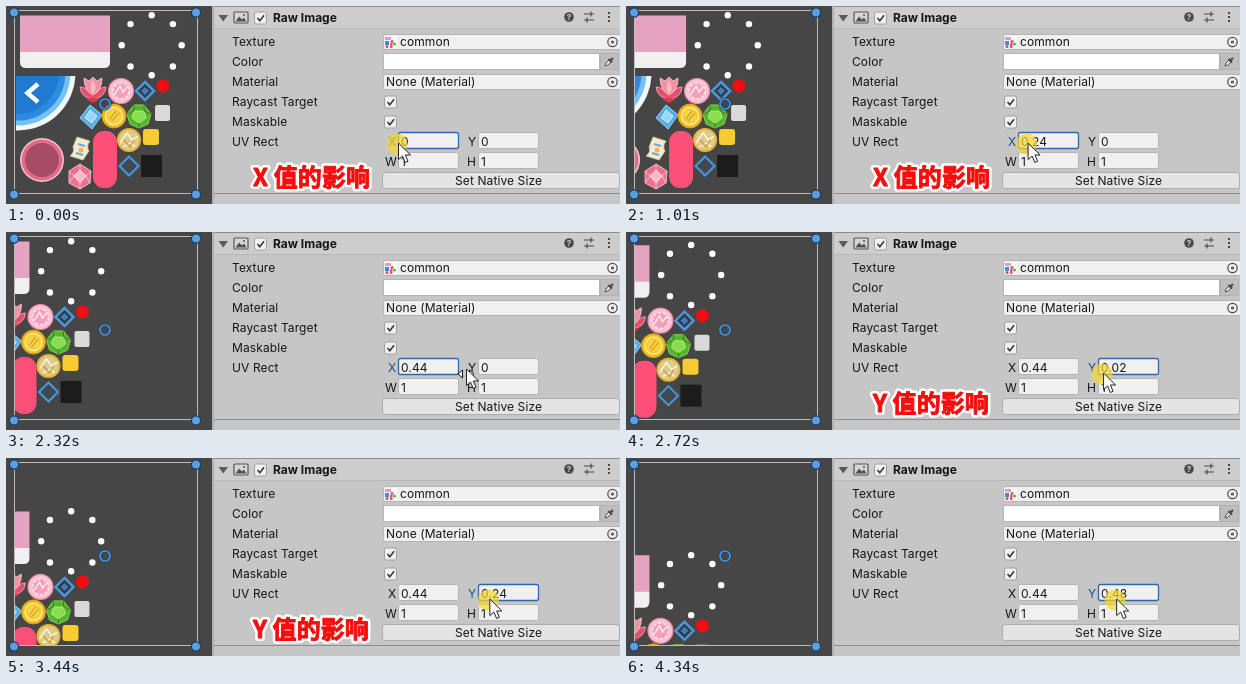
These frames come from a looping animation (614 px wide and 198 px high, 4440 ms). An HTML page:

```html
<!DOCTYPE html>
<html lang="en">
<head>
<meta charset="utf-8">
<title>UV Rect</title>
<style>
html, body { margin: 0; width: 100%; height: 100%; overflow: hidden; background: #464646; }
svg { display: block; width: 614px; height: 198px; }
text { font: 12px Inter, sans-serif; letter-spacing: .1px; fill: #151515; white-space: pre; }
.bold { font-weight: 700; letter-spacing: 0; }
.cap { font: 700 24px "Noto Sans CJK SC", "Noto Sans CJK", sans-serif; letter-spacing: .1px;
  fill: #f80c0c; stroke: #f80c0c; stroke-width: .9px; stroke-linejoin: round; }
.edge { fill: #fff; stroke: #fff; stroke-width: 6px; }
.field { fill: #f0f0f0; stroke: #b4b4b4; }
.focus { stroke: #2f67a8; stroke-width: 1.3px; }
.ico { fill: none; stroke: #4a4a4a; stroke-width: 1.2px; }
</style>
</head>
<body>
<svg viewBox="0 0 614 198">
  <defs>
    <clipPath id="view"><rect x="9" y="5" width="183" height="182"/></clipPath>
    <clipPath id="quarter"><rect x="10" y="70" width="62" height="60"/></clipPath>
    <radialGradient id="gold"><stop offset=".3" stop-color="#f8d94a"/><stop offset="1" stop-color="#eeb51c"/></radialGradient>
  </defs>
  <rect width="206" height="198" fill="#464646"/>

  <g clip-path="url(#view)"><g id="tex">
    <path d="M14 9.500H104V46.500H14Z" fill="#e5a3c1"/>
    <path d="M14 46H104V56q0 6-6 6H20q-6 0-6-6Z" fill="#f1eff0"/>
    <g id="ring" fill="#fff"></g>

    <g clip-path="url(#quarter)">
      <circle cx="12" cy="67" r="57.500" fill="#f4f8fb"/>
      <circle cx="12" cy="67" r="52.500" fill="#74c2f3"/>
      <circle cx="12" cy="67" r="47.500" fill="#2b8cdf"/>
      <circle cx="12" cy="67" r="41" fill="#1f7bd0"/>
    </g>
    <path d="M32 78L21.500 87L32 96" fill="none" stroke="#fff" stroke-width="4.500"/>

    <circle cx="36" cy="154" r="22" fill="#f3c6cf"/>
    <circle cx="36" cy="154" r="20.500" fill="#e56b86"/>
    <circle cx="36" cy="154" r="17" fill="#a64c68"/>

    <path d="M87 93Q75 92 74 81Q80 81 87 88Q94 81 100 81Q99 92 87 93Z" fill="#e4506c" stroke="#f7c3cc" stroke-width=".7"/>
    <path d="M87 89Q78 85 78 72L83 75L87 71L91 75L96 72Q96 85 87 89Z" fill="#f490a4" stroke="#fbdbe0" stroke-width=".7"/>
    <path d="M87 88Q82 82 87 74Q92 82 87 88Z" fill="#f9bcc7"/>
    <path d="M80 93Q87 91 94 93L87 97Z" fill="#d9364f"/>

    <circle cx="115" cy="85" r="12.500" fill="#f9c3d2" stroke="#ec86a5" stroke-width="1.200"/>
    <circle cx="115" cy="85" r="8" fill="#f4a0ba" stroke="#fde4ec" stroke-dasharray="3 2" stroke-width="1.600"/>
    <path d="M109 88L114 80L117 86L121 81" fill="none" stroke="#fde7ee" stroke-width="1.500"/>

    <path d="M139 76L148 85L139 94L130 85Z" fill="#343a42" stroke="#4a97de" stroke-width="2.500"/>
    <path d="M139 81L143 85L139 89L135 85Z" fill="#3f7cba"/>
    <circle cx="157" cy="80" r="6.500" fill="#f20d12"/>

    <path d="M84 99L96 109L86 123L74 112Z" fill="#53aee6" stroke="#9bd6f6"/>
    <path d="M84 104L91 110L86 117L79 112Z" fill="#9ad8f7" stroke="#e4f5fd" stroke-width=".8"/>

    <circle cx="108" cy="110" r="12" fill="url(#gold)" stroke="#d79a16"/>
    <circle cx="108" cy="110" r="8.500" fill="none" stroke="#fbef9c" stroke-width="1.300"/>
    <path d="M104 113L110 105M106 115L113 107" stroke="#dca322" stroke-width="1.500"/>

    <path d="M128 99H138L145 108L142 118L133 122L124 118L121 108Z" fill="#55b52c" stroke="#86d44e"/>
    <path d="M128 105H138L140 112L133 117L126 112Z" fill="#8add50" stroke="#c5f39b" stroke-width=".7"/>
    <path d="M128 99V105L121 108M138 99V105L145 108M133 117V122" fill="none" stroke="#377f1b"/>
    <rect x="149" y="99" width="15" height="16" rx="2" fill="#dadada"/>

    <circle cx="123" cy="134" r="11" fill="#dccb92" stroke="#e8b72d" stroke-width="2"/>
    <path d="M114 137L121 127L126 134L132 130M117 141L125 137L129 141" fill="none" stroke="#fffbe5" stroke-width="1.300"/>
    <path d="M118 134L124 141L128 134" fill="none" stroke="#c9a13f" stroke-width="1.500"/>
    <rect x="137" y="123" width="16" height="16" rx="3" fill="#f8cc30"/>
    <rect x="87" y="125" width="24" height="57" rx="11" fill="#fd5079"/>
    <path d="M123 150.500L132.500 160L123 169.500L113.500 160Z" fill="#414850" stroke="#4a97de" stroke-width="2"/>
    <rect x="135" y="149" width="21" height="22" fill="#1c1c1c"/>

    <path d="M71 131L84 135Q80 140 83 145L77 154L64 150Q69 146 67 141Z" fill="#f4ead0" stroke="#d9c28d" stroke-width=".8"/>
    <path d="M72 138L79 140M70 147L77 149" stroke="#68a9dd" stroke-width="2"/>
    <circle cx="75" cy="144" r="2.500" fill="#f0b25a"/>

    <path d="M74 158L85 165L84 177L74 183L63 177V165Z" fill="#ee6f8e" stroke="#f9b4c4"/>
    <path d="M74 164L80 170L74 177L68 170Z" fill="#f9b9c8" stroke="#fff" stroke-width=".7"/>
    <path d="M74 158V164M85 165L80 170L84 177M63 165L68 170L63 177M74 177V183" fill="none" stroke="#fbd0da" stroke-width=".8"/>
  </g></g>

  <rect x="8.500" y="4.500" width="183" height="183" fill="none" stroke="#bcbcbc"/>
  <g id="handles" fill="#5a9fe2" stroke="#1d3c60" stroke-width="1.200"></g>
  <circle cx="99" cy="98" r="5" fill="none" stroke="#1d3f66" stroke-width="3"/>
  <circle cx="99" cy="98" r="5" fill="none" stroke="#4c94dc" stroke-width="1.700"/>

  <rect x="206" width="408" height="198" fill="#c6c6c6"/>
  <rect x="206" width="2" height="198" fill="#b0b0b0"/>
  <rect x="208" width="406" height="22" fill="#cdcdcd"/>
  <path d="M208 .5H614M208 187.500H614" stroke="#8c8c8c"/>
  <path d="M208 22.500H614" stroke="#b8b8b8"/>

  <path d="M212.500 9H222L217.200 15.500Z" fill="#5a5a5a"/>
  <rect x="228" y="6" width="14" height="11" rx="1" fill="#d6d6d6" stroke="#555" stroke-width="1.200"/>
  <path d="M229.500 15.500L233 10.500L236 13.500L238 11.500L240.500 15.500Z" fill="#505050"/>
  <circle cx="238" cy="9" r="1" fill="#505050"/>
  <text class="bold" x="267" y="16">Raw Image</text>
  <circle cx="563" cy="11" r="4.800" fill="#4a4a4a"/>
  <text x="563" y="14" text-anchor="middle" style="font-size:8px;font-weight:700;fill:#d8d8d8">?</text>
  <path class="ico" d="M578 8H588M578 14H588M585 5.500V10.500M581 11.500V16.500"/>
  <path d="M602 6h2v2h-2ZM602 10h2v2h-2ZM602 14h2v2h-2Z" fill="#4a4a4a"/>

  <g id="labels"></g>
  <rect class="field" x="377.500" y="28.500" width="240" height="15" rx="2"/>
  <rect x="379" y="30" width="12" height="12" fill="#fafafa"/>
  <path d="M379 31h6v3h-6Z" fill="#e59dbc"/>
  <path d="M379 35h4v4h-4Z" fill="#3b8ddc"/>
  <path d="M384 37h2.500v5H384Z" fill="#fd5079"/>
  <circle cx="386" cy="35.500" r="1.500" fill="#e44763"/>
  <circle cx="388.500" cy="38" r="1.500" fill="#58b52e"/>
  <circle cx="381" cy="40.500" r="1.500" fill="#d94962"/>
  <text x="394" y="40">common</text>
  <rect x="377.500" y="47.500" width="216" height="16" fill="#fff" stroke="#b4b4b4"/>
  <rect x="594.500" y="47.500" width="18" height="16" fill="#bebebe" stroke="#b2b2b2"/>
  <path d="M599 60L600 57L603 54L605 56L602 59Z" fill="#e4e4e4" stroke="#555"/>
  <path d="M602.500 53L606 56.500M604.500 54.500L607 52" stroke="#4a4a4a" stroke-width="2.200"/>
  <rect class="field" x="377.500" y="68.500" width="240" height="15" rx="2"/>
  <text x="380" y="80">None (Material)</text>
  <g class="ico">
    <circle cx="606.500" cy="36" r="4.700"/><circle cx="606.500" cy="36" r="1"/>
    <circle cx="606.500" cy="76" r="4.700"/><circle cx="606.500" cy="76" r="1"/>
  </g>
  <g id="checks"></g>

  <rect id="boxX" class="field" x="392.500" y="126.500" width="60" height="16" rx="2"/>
  <rect id="boxY" class="field" x="472.500" y="126.500" width="60" height="16" rx="2"/>
  <rect class="field" x="392.500" y="146.500" width="60" height="16" rx="2"/>
  <rect class="field" x="472.500" y="146.500" width="60" height="16" rx="2"/>
  <text id="nameX" x="382" y="140">X</text>
  <text id="nameY" x="462" y="140">Y</text>
  <text x="379" y="160">W</text>
  <text x="461" y="160">H</text>
  <text id="valX" x="395" y="140"></text>
  <text id="valY" x="475" y="140"></text>
  <text x="395" y="160">1</text>
  <text x="475" y="160">1</text>
  <rect x="376.500" y="166.500" width="237" height="16" rx="2.500" fill="#e4e4e4" stroke="#adadad"/>
  <text x="449" y="179">Set Native Size</text>

  <text class="cap edge" x="247" y="180"></text>
  <text class="cap" x="247" y="180"></text>
  <g id="mouse">
    <circle id="glow" r="10.500" fill="#f3d72c" opacity=".7"/>
    <path id="arrows" d="M-2.500 0V8L-7 4ZM4.500 0V8L9 4Z" fill="#fff" stroke="#111"/>
    <path d="M1.500 -1V15.500L5.500 12L8.300 18.500L11 17.300L8.300 11H13.500Z" fill="#fff" stroke="#222" stroke-linejoin="round"/>
  </g>
</svg>
<script>
const LOOP = 4440;
const $ = id => document.getElementById(id);
const put = (id, html) => { $(id).innerHTML = html; };
const caps = document.querySelectorAll('.cap');

put('ring', Array.from({ length: 8 }, (_, i) => {
  const a = i * Math.PI / 4;
  return `<circle cx="${145.7 + 30 * Math.cos(a)}" cy="${39.3 + 30 * Math.sin(a)}" r="3.2"/>`;
}).join(''));
put('handles', [8, 190].flatMap(x => [6.5, 188.5].map(y =>
  `<circle cx="${x}" cy="${y}" r="4.6"/>`)).join(''));
put('labels', ['Texture', 'Color', 'Material', 'Raycast Target', 'Maskable', 'UV Rect']
  .map((s, i) => `<text x="226" y="${40 + 20 * i}">${s}</text>`).join(''));
put('checks', [[254, 11.5], [384, 95.5], [384, 115.5]].map(([x, y]) =>
  `<rect class="field" x="${x - 5.5}" y="${y - 5.5}" width="12" height="12" rx="2" style="stroke:#a0a0a0"/>
   <path d="M${x - 2.5} ${y + .5}l2.300 2.700l4.300-5.500" fill="none" stroke="#333" stroke-width="1.500"/>`).join(''));

// [time, value]: each value holds until the next step
const dragX = [[0, 0], [310, .04], [410, .08], [610, .12], [710, .16], [910, .2], [1010, .24],
  [1310, .29], [1410, .34], [1530, .39], [1630, .44]];
const dragY = [[0, 0], [2720, .02], [2820, .04], [2920, .06], [3240, .12], [3340, .18], [3440, .24],
  [3640, .29], [3740, .34], [3840, .39], [4040, .44], [4140, .48]];
const walk = [[2120, 422], [2220, 441], [2320, 459], [2420, 469]];
const at = (steps, t) => steps.filter(s => s[0] <= t).pop()[1];

function draw(t) {
  const u = at(dragX, t), v = at(dragY, t);
  const onY = t >= 2520, moving = t >= 2120 && !onY;
  const x = onY ? 475.5 + 28.5 * v : moving ? at(walk, t) : 391 + 40 * u;
  const y = onY ? 142 : 138;
  const cap = t < 2120 ? 'X 值的影响' : onY && t < 4340 ? 'Y 值的影响' : '';

  $('tex').setAttribute('transform', `translate(${-183 * u} ${183 * v})`);
  $('valX').textContent = +u.toFixed(2);
  $('valY').textContent = +v.toFixed(2);
  $('boxX').classList.toggle('focus', !onY);
  $('boxY').classList.toggle('focus', onY);
  $('nameX').style.fill = onY ? '' : '#1f4f8c';
  $('nameY').style.fill = onY ? '#1f4f8c' : '';
  $('mouse').setAttribute('transform', `translate(${x} ${y})`);
  $('glow').style.display = t < 1920 || onY ? '' : 'none';
  $('arrows').style.display = t >= 2320 && !onY ? '' : 'none';
  caps.forEach(c => { c.textContent = cap; });
}

const start = performance.now();
function tick() {
  draw((performance.now() - start) % LOOP);
  requestAnimationFrame(tick);
}
tick();
</script>
</body>
</html>
```
